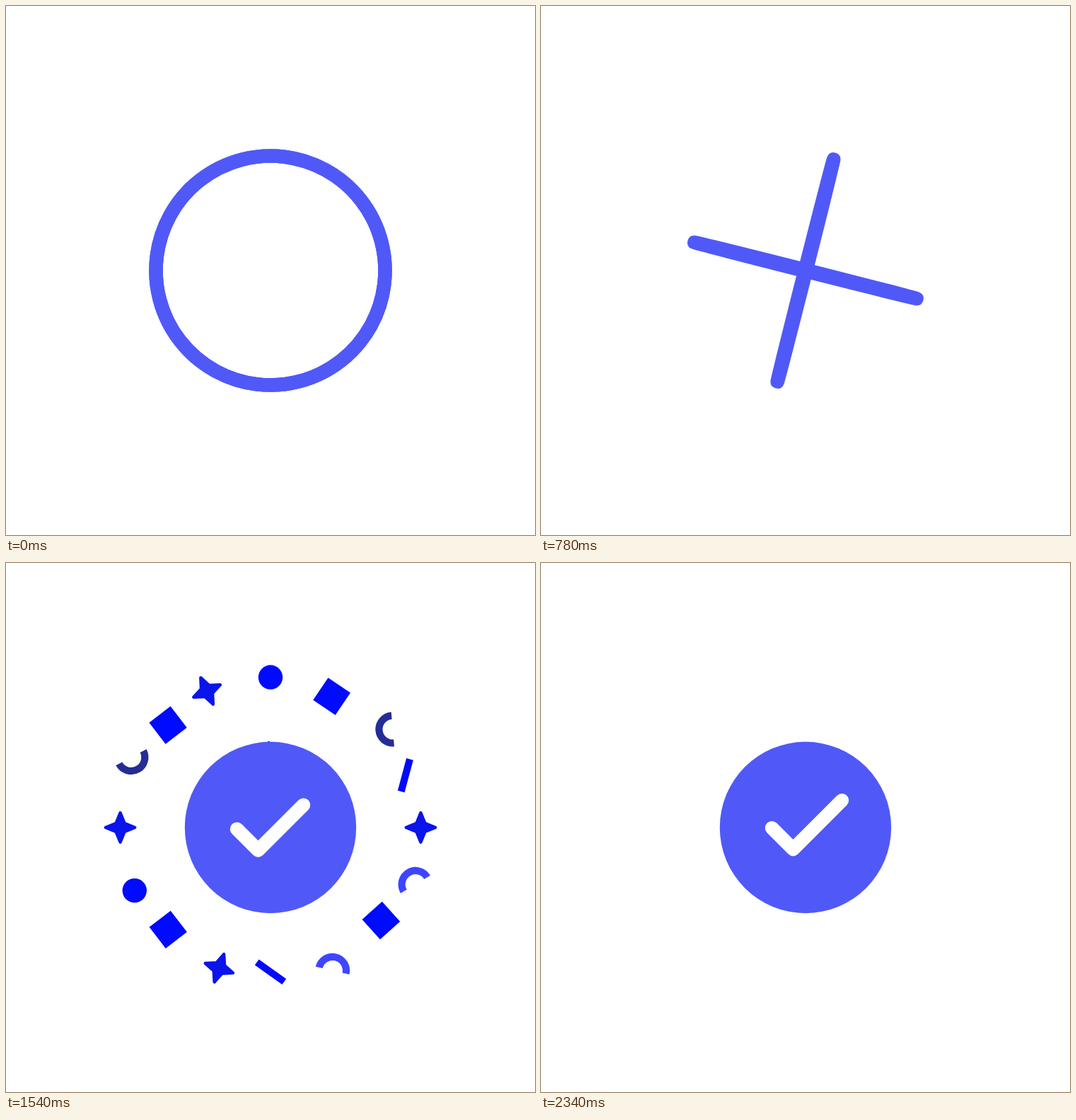
Write an HTML page that moves like this. It is 748 px wide and 748 px high and loops after 2.82 s.

```html
<!DOCTYPE html>
<html lang="en">
<head>
<meta charset="utf-8">
<title>Success check</title>
<style>
  html, body { margin: 0; width: 100%; height: 100%; overflow: hidden; background: #fff; }
  svg { display: block; width: 100vw; height: 100vh; }
</style>
</head>
<body>
<svg viewBox="0 0 748 748">
  <defs>
    <rect id="square" x="-19" y="-19" width="38" height="38" fill="#000aff"/>
    <rect id="bar" x="-23.7" y="-5" width="47.4" height="10" fill="#000aff"/>
    <circle id="dot" r="17.2" fill="#000aff"/>
    <path id="star" d="M0-20.7 6-6 20.7 0 6 6 0 20.7-6 6-20.7 0-6-6Z"
      fill="#0a14eb" stroke="#0a14eb" stroke-width="4.5" stroke-linejoin="round"/>
    <path id="arc" d="M-19.4 12a19.4 19.4 0 0 1 38.8 0" fill="none" stroke="#3d46ff" stroke-width="10.2"/>
    <path id="darkArc" d="M-19.4 12a19.4 19.4 0 0 1 38.8 0" fill="none" stroke="#252c96" stroke-width="10.2"/>
  </defs>
  <g id="rings" fill="none" stroke="#5059f7" stroke-width="19.6"></g>
  <g id="confetti"></g>
  <circle id="disc" cx="374" cy="374" fill="#5059f7"/>
  <path id="check" d="M326.5 374.7 356.5 404.7 425.5 335.7" fill="none" stroke="#fff"
    stroke-width="19.4" stroke-linecap="round" stroke-linejoin="round"/>
</svg>
<script>
const LOOP = 2820, STEP = 20, C = 374, R = 162;
const NS = 'http://www.w3.org/2000/svg';
const $ = id => document.getElementById(id);
const add = (parent, tag) => parent.appendChild(document.createElementNS(NS, tag));
const set = (el, attrs) => { for (const k in attrs) el.setAttribute(k, attrs[k]); };

const ease = (t, from, to) => {
  const u = Math.min(1, Math.max(0, (t - from) / (to - from)));
  return u * u * (3 - 2 * u);
};

// Distance from the centre, quartic ease-out
const REACH = 277, BURST = 1204, TRAVEL = 1096, SAMPLE = 1740, VANISH = 2150;
const reach = t => {
  const u = Math.min(1, Math.max(0, (t - BURST) / TRAVEL));
  return REACH * (1 - (1 - u) ** 4);
};

// Positions are those at SAMPLE: [shape, x, y, angle]
const outer = [
  ['dot', 374, 116.5, 0], ['dot', 141, 482, 0],
  ['star', 631.5, 374, 0], ['star', 116.5, 374, 0],
  ['star', 265, 140, -25], ['star', 286, 615, 19],
  ['square', 482, 142.7, 34], ['square', 193.3, 193.5, 52.5],
  ['square', 193.5, 554, 52.5], ['square', 569, 538, 48],
  ['bar', 612, 282, 105], ['bar', 374, 628.7, 35.5],
  ['darkArc', 569, 207, -95], ['darkArc', 142, 266.5, 152],
  ['arc', 615, 459, -31], ['arc', 483.5, 605, 13]
];
const inner = [
  ['dot', 485, 248.3, 0], ['dot', 430.5, 515, 0],
  ['star', 369.7, 203, 0], ['star', 523.5, 306.5, -23],
  ['star', 488.7, 477, 45], ['star', 222, 422.5, -27],
  ['square', 437, 220, 29], ['square', 517.3, 428.5, 31],
  ['square', 361.5, 522, 12], ['square', 223.5, 313, 27],
  ['bar', 316.3, 216.7, 15], ['bar', 255.3, 470.5, 83],
  ['darkArc', 533, 375, -52], ['darkArc', 296, 505, 62],
  ['arc', 257, 255, 172], ['arc', 212, 368, 127]
];

const pieces = [];
function burst(list, delay, size) {
  for (const [shape, x, y, angle] of list) {
    const el = add($('confetti'), 'use');
    el.setAttribute('href', '#' + shape);
    const lag = delay + (shape === 'square' || shape === 'bar' ? 25 : 0);
    const scale = shape === 'dot' ? 1 : size;
    const k = 1 / reach(SAMPLE - lag);
    pieces.push({ el, lag, dx: (x - C) * k, dy: (y - C) * k, pose: `rotate(${angle}) scale(${scale})` });
  }
}
burst(outer, 0, 1);
burst(inner, 160, 0.71);

const rings = [0, 90].map(turn => ({ turn, el: add($('rings'), 'ellipse') }));
const disc = $('disc'), check = $('check');
const checkLength = check.getTotalLength();

function draw(t) {
  const fade = 1 - ease(t, 950, 1277);
  const flat = Math.max(0.01, R * ease(Math.abs(t - 748), 0, 750));
  for (const { el, turn } of rings) {
    set(el, {
      rx: R, ry: flat, opacity: fade,
      transform: `translate(${C} ${C}) rotate(${turn + (t - 666) * 0.1245})`
    });
  }

  for (const { el, lag, dx, dy, pose } of pieces) {
    const local = t - lag, d = reach(local);
    set(el, {
      visibility: local > BURST && local < VANISH ? 'visible' : 'hidden',
      transform: `translate(${C + dx * d} ${C + dy * d}) ${pose}`
    });
  }

  disc.setAttribute('r', 121.2 * ease(t, 900, 1317));

  const drawn = ease(t, 1200, 1593);
  set(check, {
    visibility: drawn > 0 ? 'visible' : 'hidden',
    'stroke-dasharray': `${checkLength * drawn} ${checkLength * 2}`,
    transform: `translate(0 ${30 * (1 - drawn)})`
  });
}

const start = performance.now();
function tick() {
  const t = (performance.now() - start) % LOOP;
  draw(Math.floor(t / STEP) * STEP);
  requestAnimationFrame(tick);
}
draw(0);
requestAnimationFrame(tick);
</script>
</body>
</html>
```
